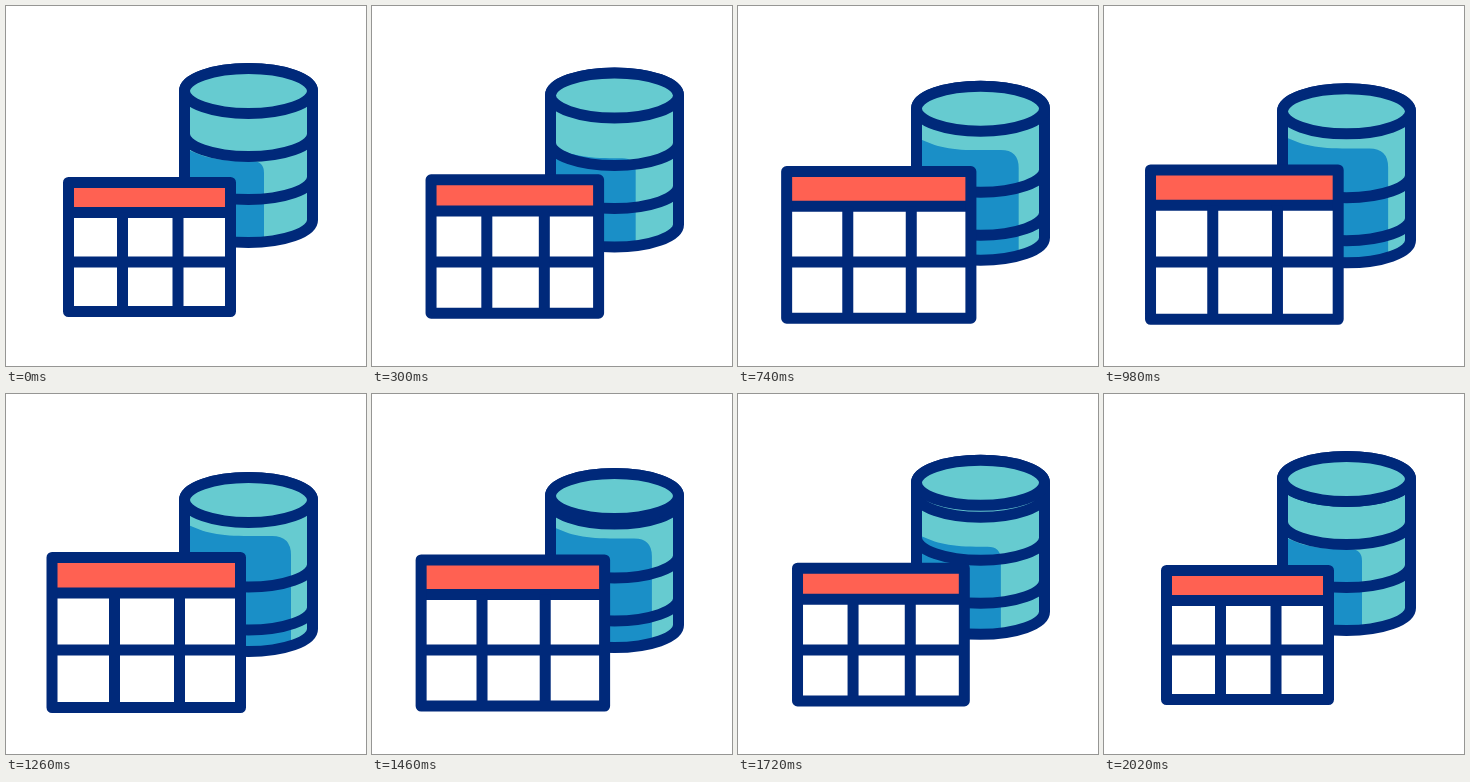
An HTML page with a canvas that plays this animation: 360 by 360 pixels, repeating every 2220 ms.

```html
<!DOCTYPE html>
<html lang="en">
<head>
<meta charset="utf-8">
<title>Database and table</title>
<style>
html, body { margin: 0; width: 100%; height: 100%; overflow: hidden; background: #fff; }
canvas { display: block; width: 360px; height: 360px; }
</style>
</head>
<body>
<canvas id="stage" width="360" height="360"></canvas>
<script>
const ctx = document.getElementById('stage').getContext('2d');
const NAVY = '#00297a', TEAL = '#66cbd0', BLUE = '#1a8fc7', CORAL = '#ff6152';
const LOOP = 2220, CX = 242.5, RX = 64, RY = 22.5, STEP = 43;

const lerp = (a, b, k) => a + (b - a) * k;
const span = (t, from, to) => Math.min(1, Math.max(0, (t - from) / (to - from)));
const easeOut = (u, power) => 1 - (1 - u) ** power;

// 0 = small table, cylinder up; 1 = large table, cylinder down
function growth(t) {
  return t < 1410
    ? easeOut(span(t, 210, 1260), 2.6)
    : 1 - easeOut(span(t, 1410, 2020), 2.4);
}

// Offset of the bands within the cylinder
function bandShift(t, grow) {
  if (t < 1410) return 21.5 * grow;
  if (t < 1560) return lerp(21.5, 10.5, easeOut(span(t, 1410, 1560), 1.5));
  if (t < 1720) return lerp(10.5, 12, span(t, 1560, 1720));
  return 12 * (1 - span(t, 1720, 2020));
}

function line(x1, y1, x2, y2) {
  ctx.beginPath();
  ctx.moveTo(x1, y1);
  ctx.lineTo(x2, y2);
  ctx.stroke();
}

function band(y) {
  ctx.beginPath();
  ctx.ellipse(CX, y, RX, RY, 0, 0, Math.PI);
  ctx.stroke();
}

function bodyPath(top, bottom) {
  ctx.beginPath();
  ctx.ellipse(CX, top, RX, RY, 0, Math.PI, 2 * Math.PI);
  ctx.ellipse(CX, bottom, RX, RY, 0, 0, Math.PI);
  ctx.closePath();
}

function drawShadow(grow) {
  const right = lerp(258, 285, grow), top = lerp(155, 142, grow), r = lerp(12, 19, grow);
  ctx.beginPath();
  ctx.moveTo(170, top - 18);
  ctx.bezierCurveTo(190, top - 6, 205, top, 238, top);
  ctx.lineTo(right - r, top);
  ctx.quadraticCurveTo(right, top, right, top + r);
  ctx.lineTo(right, 290);
  ctx.lineTo(170, 290);
  ctx.fillStyle = BLUE;
  ctx.fill();
}

function drawCylinder(t, grow) {
  const top = 85 + 21 * grow, bottom = top + 3 * STEP;
  const shift = bandShift(t, grow);
  ctx.save();
  bodyPath(top, bottom);
  ctx.clip();
  ctx.fillStyle = TEAL;
  ctx.fillRect(0, 0, 360, 360);
  drawShadow(grow);
  for (let i = 1; i < 3; i++) band(top + i * STEP + shift);
  // A further band slips out below the rim on the way back
  if (t > 1410) band(top + shift * span(t, 1410, 1560));
  ctx.restore();

  bodyPath(top, bottom);
  ctx.stroke();
  ctx.beginPath();
  ctx.ellipse(CX, top, RX, RY, 0, 0, 2 * Math.PI);
  ctx.fillStyle = TEAL;
  ctx.fill();
  ctx.stroke();
}

function drawTable(grow) {
  const at = (a, b) => lerp(a, b, grow);
  const left = at(62.5, 46), right = at(224.5, 234.5);
  const top = at(176.5, 163.5), bottom = at(305.5, 313.5);
  const head = at(206.5, 199), row = 256;
  ctx.fillStyle = '#fff';
  ctx.fillRect(left, top, right - left, bottom - top);
  ctx.fillStyle = CORAL;
  ctx.fillRect(left, top, right - left, head - top);
  for (const y of [head, row]) line(left, y, right, y);
  for (const x of [at(116.5, 108.5), at(172, 173.5)]) line(x, head, x, bottom);
  ctx.strokeRect(left, top, right - left, bottom - top);
}

function draw(now) {
  const t = now % LOOP, grow = growth(t);
  ctx.fillStyle = '#fff';
  ctx.fillRect(0, 0, 360, 360);
  ctx.strokeStyle = NAVY;
  ctx.lineWidth = 11;
  ctx.lineJoin = 'round';
  drawCylinder(t, grow);
  drawTable(grow);
}

const start = performance.now();
function tick() {
  draw(performance.now() - start);
  requestAnimationFrame(tick);
}
tick();
</script>
</body>
</html>
```
